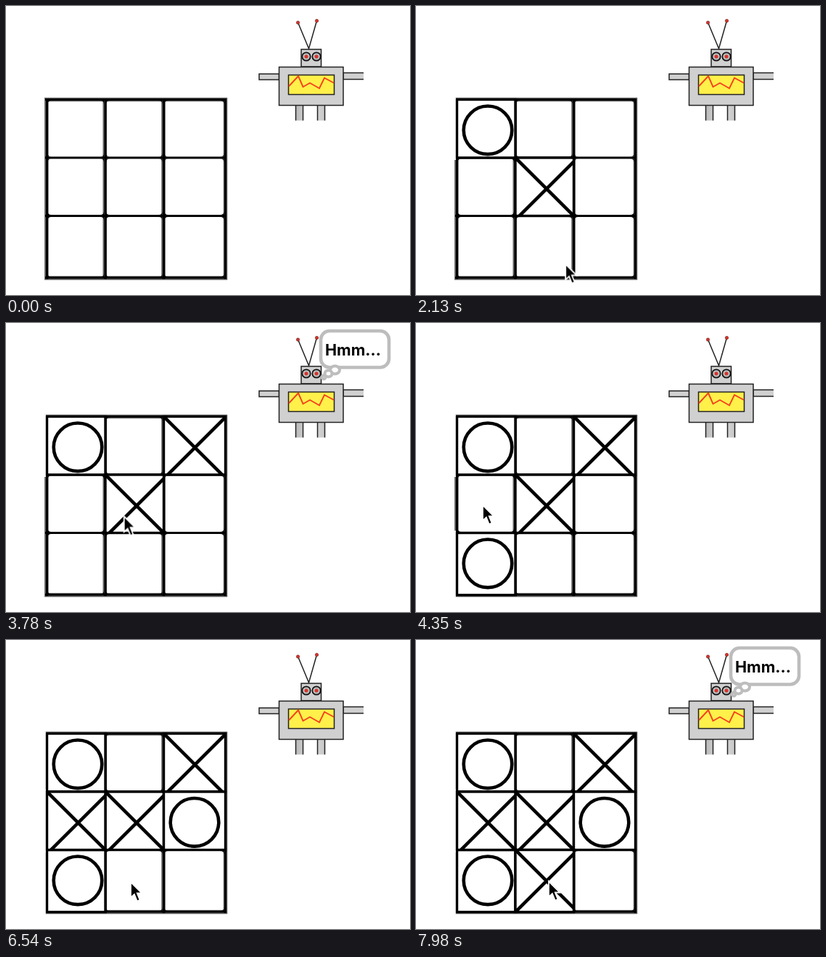
Recreate the animation shown at these times as an HTML page. Size 557 by 400 pixels, loop 8000 ms.

```html
<!DOCTYPE html>
<html lang="en">
<head>
<meta charset="utf-8">
<title>Noughts and crosses with a robot</title>
<style>
html, body { margin: 0; width: 100%; height: 100%; overflow: hidden; background: #fff; }
svg { display: block; }
#stage { width: 557px; height: 400px; }
#board { filter: blur(.5px); }
.halo { fill: none; stroke: #6a6a6a; stroke-width: 5.6; }
.grid { fill: none; stroke: #000; stroke-width: 3.2; }
.ink { fill: none; stroke: #000; stroke-width: 4.6; }
.metal { fill: #d0d0d0; stroke: #222; stroke-width: 1.5; }
.cloud { fill: #fff; stroke: #bdbdbd; stroke-width: 4.6; }
.words { font: bold 21.5px Inter, "Open Sans", sans-serif; }
.mark, #bubble { animation: 8s step-end infinite; }
#x1 { animation-name: x1; }
#o1 { animation-name: o1; }
#x2 { animation-name: x2; }
#o2 { animation-name: o2; }
#x3 { animation-name: x3; }
#o3 { animation-name: o3; }
#x4 { animation-name: x4; }
#bubble { animation-name: think; }
#cursor { animation: travel 8s ease-in-out infinite; }
@keyframes x1 { 0% { visibility: hidden } 10.9%, 100% { visibility: visible } }
@keyframes o1 { 0% { visibility: hidden } 19.8%, 100% { visibility: visible } }
@keyframes x2 { 0% { visibility: hidden } 39%, 100% { visibility: visible } }
@keyframes o2 { 0% { visibility: hidden } 48%, 100% { visibility: visible } }
@keyframes x3 { 0% { visibility: hidden } 59%, 100% { visibility: visible } }
@keyframes o3 { 0% { visibility: hidden } 69.3%, 100% { visibility: visible } }
@keyframes x4 { 0% { visibility: hidden } 95.5%, 100% { visibility: visible } }
@keyframes think {
  0%, 19.8%, 48%, 69.3% { visibility: hidden }
  10.9%, 39%, 59%, 95.5%, 100% { visibility: visible }
}
/* Parks below the stage between visits. */
@keyframes travel {
  0% { transform: translate(39px, 420px); animation-timing-function: step-end }
  1.2% { transform: translate(40px, 364px) }
  8.5%, 10.9% { transform: translate(181px, 252px) }
  12.2% { transform: translate(181px, 252px); animation-timing-function: step-end }
  12.3% { transform: translate(170px, 420px) }
  21% { transform: translate(170px, 402px) }
  30.5% { transform: translate(225px, 334px) }
  36.5%, 37.5% { transform: translate(252px, 181px) }
  39.4% { transform: translate(256px, 180px) }
  42% { transform: translate(250px, 190px) }
  48% { transform: translate(160px, 270px) }
  53.5%, 54.4% { transform: translate(92px, 252px) }
  59%, 60.5% { transform: translate(95px, 256px) }
  67.8% { transform: translate(25px, 397px) }
  69% { transform: translate(23px, 410px) }
  72% { transform: translate(23px, 402px) }
  80.5%, 82% { transform: translate(172px, 335px) }
  91%, 100% { transform: translate(183px, 334px) }
}
</style>
</head>
<body>
<svg id="stage" viewBox="0 0 557 400">
  <defs>
    <path id="corner" d="M0 0H5Q0 0 0 5Z"/>
    <linearGradient id="tube">
      <stop offset="0" stop-color="#b8b8b8"/>
      <stop offset=".5" stop-color="#dedede"/>
      <stop offset="1" stop-color="#c8c8c8"/>
    </linearGradient>
  </defs>

  <g id="board">
    <path class="halo" d="M53 129.500H305M53 376.500H305M55.800 127V379M136.300 127V379M217 127V379M302.500 127V379"/>
    <path class="grid" d="M54 129.500H304M54 210H304M54 290.500H304M54 376H304M56.500 128V378M137 128V378M217.500 128V378M302.500 128V378"/>
    <g id="corners"></g>
    <g id="marks"></g>
  </g>

  <g id="robot">
    <path d="M403 24L417.500 59L428 22" fill="none" stroke="#222" stroke-width="1.5"/>
    <g fill="#d8322a" stroke="#622" stroke-width=".6">
      <circle cx="402.500" cy="23" r="2.200"/>
      <circle cx="428.500" cy="20.500" r="2.200"/>
    </g>
    <rect class="metal" x="407" y="60" width="27.500" height="24"/>
    <g fill="#bbb" stroke="#111" stroke-width="1.700">
      <circle cx="414" cy="70" r="5.700"/>
      <circle cx="428" cy="70" r="5.700"/>
    </g>
    <g fill="#d8322a">
      <circle cx="414" cy="70" r="2.500"/>
      <circle cx="428" cy="70" r="2.500"/>
    </g>
    <rect class="metal" x="349" y="94" width="27.500" height="8"/>
    <path class="metal" d="M493 92.500H465V101.500H493"/>
    <path class="metal" style="fill:url(#tube)" d="M399.500 158.500V137H409.500V158.500M429.500 158.500V137H439.500V158.500"/>
    <rect class="metal" x="376.500" y="84.500" width="88.500" height="53"/>
    <rect x="389.500" y="95.500" width="63" height="27" fill="#fff04a" stroke="#222" stroke-width="1.500"/>
    <path d="M390 111L403 97L409.500 112L419 106.500L432 114L439 99.500L452 106.500" fill="none" stroke="#f5401c" stroke-width="1.900"/>
  </g>

  <g id="bubble">
    <rect class="cloud" x="434" y="11" width="94" height="50.500" rx="12"/>
    <g class="cloud" style="stroke-width:4">
      <ellipse cx="453.500" cy="65" rx="6.500" ry="5.500"/>
      <ellipse cx="444.500" cy="70" rx="5" ry="4.500"/>
      <circle cx="438" cy="75" r="2.500"/>
    </g>
    <text class="words" x="440" y="45">Hmm...</text>
  </g>

  <path id="cursor" d="M0 0V21.500L4.900 17L8.800 26.500L12.600 24.900L8.800 15.500H15.500Z" fill="#000" stroke="#fff" stroke-width="1.800"/>
</svg>
<script>
const column = [56.5, 137, 217.5, 302.5];
const row = [129.5, 210, 290.5, 376.5];
const moves = [
  ["x1", 1, 1], ["o1", 0, 0], ["x2", 2, 0], ["o2", 0, 2],
  ["x3", 0, 1], ["o3", 2, 1], ["x4", 1, 2]
];
const signs = {
  x: '<path class="ink" d="M0 0L86 86M86 0L0 86"/>',
  o: '<circle class="ink" cx="42.5" cy="42.3" r="33.3"/>'
};

// A played square has square corners and a thinner frame than an empty one.
function square([id, c, r]) {
  const [left, top] = [column[c], row[r]];
  const width = column[c + 1] - left;
  const height = row[r + 1] - top;
  const size = `width="${width}" height="${height}"`;
  const edge = c ? "" : `<rect x="52" y="${top - 3}" width="3" height="${height + 6}" fill="#fff"/>`;
  return `<g class="mark" id="${id}">${edge}
    <rect x="${left}" y="${top}" ${size} fill="#fff" stroke="#000" stroke-width="3.4"/>
    <svg x="${left}" y="${top}" ${size} overflow="hidden">${signs[id[0]]}</svg></g>`;
}

function roundedCorners() {
  let out = "";
  for (let c = 0; c < 3; c++) for (let r = 0; r < 3; r++) {
    for (const i of [0, 1]) for (const j of [0, 1]) {
      const x = column[c + i] + (i ? -2 : 1);
      const y = row[r + j] + (j ? -1.5 : 1.5);
      out += `<use href="#corner" transform="translate(${x} ${y}) scale(${i ? -1 : 1} ${j ? -1 : 1})"/>`;
    }
  }
  return out;
}

document.getElementById("corners").innerHTML = roundedCorners();
document.getElementById("marks").innerHTML = moves.map(square).join("");
</script>
</body>
</html>
```
